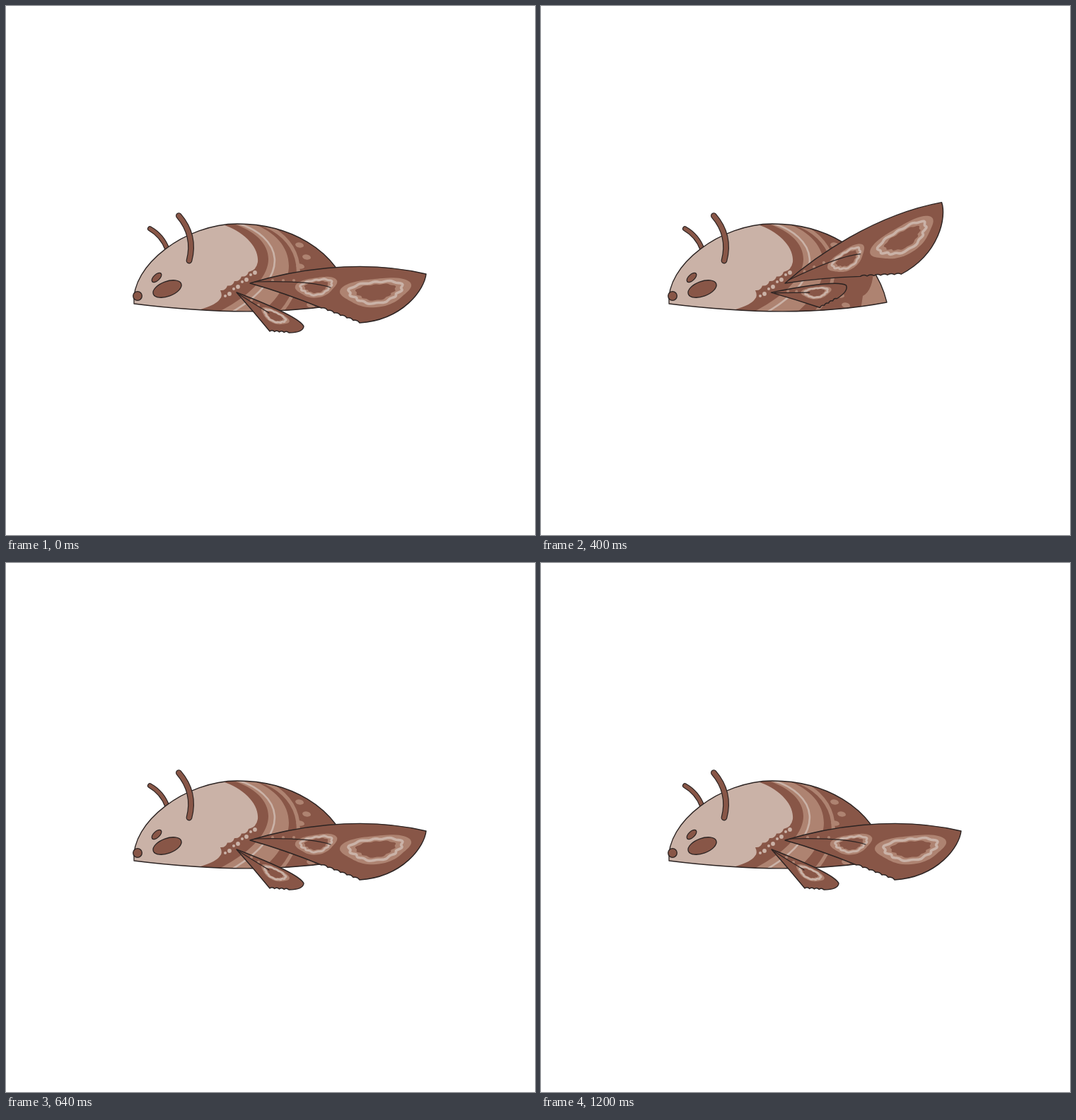
An HTML page with a canvas that plays this animation: 748x748 px, repeating every 1280 ms.

```html
<!DOCTYPE html>
<html lang="en">
<head>
<meta charset="utf-8">
<title>Moth seal</title>
<style>
  html, body { margin: 0; width: 100%; height: 100%; overflow: hidden; background: #fff; }
  canvas { display: block; }
</style>
</head>
<body>
<canvas id="stage" width="748" height="748"></canvas>
<script>
const ctx = document.getElementById('stage').getContext('2d');
const INK = '#2b2322', DARK = '#885647', MID = '#ae8371', LIGHT = '#cab2a7';
const STEP = 80, STEPS = 16;
const LIFT = [0, 7.8, 14, 24.3, 31];  // wing angle in degrees
const PULL = [0, .5, 1, 1.4];         // how far the antennae lean back

// Path data for a ragged edge of small bumps; a negative depth turns them over.
function ragged(x0, y0, x1, y1, count, depth) {
  const dx = (x1 - x0) / count, dy = (y1 - y0) / count, size = depth / Math.hypot(dx, dy);
  let data = '';
  for (let i = 0; i < count; i++) {
    const x = x0 + dx * i, y = y0 + dy * i;
    data += `Q${x + dx / 2 - dy * size} ${y + dy / 2 + dx * size} ${x + dx} ${y + dy}`;
  }
  return data;
}

// Rounded triangle with a wavy rim.
function blob(x, y, rx, ry, tilt, wave) {
  const path = new Path2D(), c = Math.cos(tilt), s = Math.sin(tilt);
  for (let a = 0; a < 2 * Math.PI; a += .08) {
    const r = 1 - .1 * Math.sin(3 * a) + wave * Math.sin(11 * a);
    const u = rx * r * Math.cos(a), v = ry * r * Math.sin(a);
    path.lineTo(x + u * c - v * s, y + u * s + v * c);
  }
  path.closePath();
  return path;
}

function oval(x, y, rx, ry = rx, tilt = 0) {
  const path = new Path2D();
  path.ellipse(x, y, rx, ry, tilt, 0, 2 * Math.PI);
  return path;
}

// Back stripes: k runs from the first stripe (0) to the last (1).
const sweep = k =>
  `M${318 + 40 * k} 307C${380 + 33 * k} 325 ${404 + 30 * k} 380 ${298 + 90 * k} 434`;
const behind = k => new Path2D(sweep(k) + 'H520V300Z');

const body = new Path2D(`M181 421C176 366 255 308 327 308C395 308 470 340 489 419
  C400 436 300 436 181 421Z`);
const head = new Path2D(`M306 309C335 318 358 340 356 362Q354 374 343 376
  ${ragged(343, 376, 303, 402, 4, -5)}Q307 411 302 415Q296 424 264 432L170 440V300Z`);
const rump = new Path2D('M470 370Q470 402 455 410L452 430H498V370Z');

const bigWing = {
  pivot: [345, 392], swing: 1,
  outline: new Path2D(`M345 392C400 375 500 356 594 379C592 400 562 444 500 448
    ${ragged(500, 448, 446, 427, 6, 3)}Q395 406 345 392Z`),
  vein: new Path2D('M352 390Q430 388 459 398'),
  spots: [[439, 397, 29, 14, -.15], [523, 404, 49, 20, -.1]],
  dots: { x: 377, y: 388, dx: 15, dy: 0, count: 3 }
};
const smallWing = {
  pivot: [326, 406], swing: 1.33,
  outline: new Path2D(`M326 405C360 418 415 440 421 453Q420 462 400 462
    ${ragged(400, 462, 373, 460, 4, 3)}Q350 432 326 405Z`),
  vein: new Path2D('M330 408Q352 422 372 434'),
  spots: [[380, 439, 21, 8.5, .45]],
  dots: { x: 347, y: 416, dx: 10, dy: 7, count: 2 }
};

// angle and bend: [upright, leaning back]
const farAntenna = { base: [228, 344], angle: [-40, 3], length: 38, bend: [7, -3], width: 5.5 };
const nearAntenna = { base: [259, 360], angle: [-13, 11], length: 65, bend: [17, -5], width: 7 };

function fill(path, color) {
  ctx.fillStyle = color;
  ctx.fill(path);
}
function line(path, color, width) {
  ctx.strokeStyle = color;
  ctx.lineWidth = width;
  ctx.stroke(path);
}

function drawAntenna({ base: [x, y], angle, length, bend, width }, pull) {
  const mix = ([from, to]) => from + (to - from) * pull;
  const turn = mix(angle) * Math.PI / 180, bow = mix(bend);
  const s = Math.sin(turn), c = Math.cos(turn), half = length / 2;
  const path = new Path2D(`M${x} ${y}Q${x + s * half + c * bow} ${y - c * half + s * bow}
    ${x + s * length} ${y - c * length}`);
  line(path, INK, width + 1.8);
  line(path, DARK, width - .6);
}

function drawBody() {
  ctx.save();
  ctx.clip(body);
  fill(body, DARK);
  fill(behind(0), MID);
  fill(behind(.7), DARK);
  fill(head, LIGHT);
  line(new Path2D(sweep(.22)), LIGHT, 2.6);
  line(new Path2D(sweep(1)), MID, 5);
  fill(rump, MID);
  for (const [x, y] of [[415, 338], [425, 355], [416, 368], [423, 409], [431, 423]])
    fill(oval(x, y, 6, 3.6, .2), MID);
  for (let i = 0; i < 8; i++)
    fill(oval(352 - 6 * i, 377 + 5 * i - i % 2 * 2, i % 2 ? 2 : 2.9), LIGHT);
  ctx.restore();
  line(body, INK, 1.3);
  for (const part of [oval(228, 400, 21, 10.5, -.35), oval(213, 384, 8.5, 4.3, -.75), oval(186, 410, 6.3)]) {
    fill(part, DARK);
    line(part, INK, 1.3);
  }
}

function drawWing({ pivot: [x, y], swing, outline, vein, spots, dots }, lift) {
  ctx.save();
  ctx.translate(x, y);
  ctx.rotate(-lift * swing * Math.PI / 180);
  ctx.translate(-x, -y);
  fill(outline, DARK);
  for (const [cx, cy, rx, ry, tilt] of spots) {
    const ring = scale => blob(cx, cy, rx * scale, ry * scale, tilt, scale < 1 ? .05 : 0);
    fill(ring(1), MID);
    line(ring(.75), LIGHT, 2 + rx / 30);
    fill(ring(.56), DARK);
  }
  for (let i = 0; i < dots.count; i++)
    fill(oval(dots.x + dots.dx * i, dots.y + dots.dy * i, 2.1), MID);
  line(vein, INK, 1.2);
  line(outline, INK, 1.4);
  ctx.restore();
}

const start = performance.now();
function tick() {
  const step = Math.floor((performance.now() - start) / STEP) % STEPS;
  const lift = LIFT[Math.max(0, 4 - Math.abs(step - 4))];
  const pull = PULL[Math.max(0, 3 - Math.abs(step - 12))];
  ctx.clearRect(0, 0, 748, 748);
  ctx.lineCap = ctx.lineJoin = 'round';
  drawAntenna(farAntenna, pull);
  drawBody();
  drawAntenna(nearAntenna, pull);
  drawWing(smallWing, lift);
  drawWing(bigWing, lift);
  requestAnimationFrame(tick);
}
tick();
</script>
</body>
</html>
```
